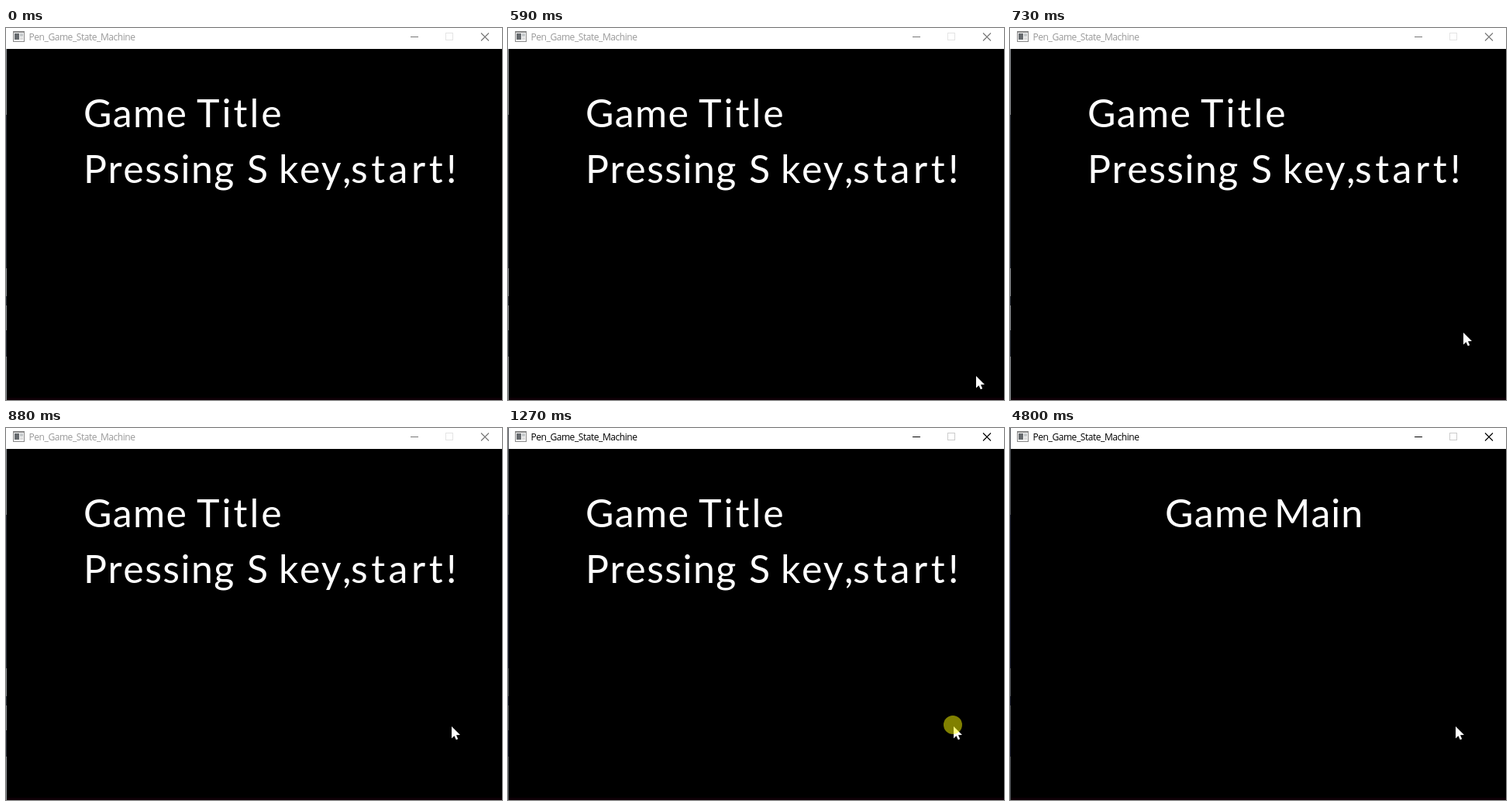
Animation, 640 px wide and 480 px high, one loop 8000 ms. Source, as an HTML page with a canvas:

```html
<!DOCTYPE html>
<html lang="en">
<head>
<meta charset="utf-8">
<title>Pen_Game_State_Machine</title>
<style>
  html, body { margin: 0; width: 100%; height: 100%; overflow: hidden; background: #000; }
  canvas { display: block; width: 640px; height: 480px; }
</style>
</head>
<body>
<canvas id="stage" width="640" height="480"></canvas>
<script>
const ctx = document.getElementById('stage').getContext('2d');
const LOOP = 8000;
const BIG = '50px Lato, "Open Sans", sans-serif';
const SMALL = '12px "Open Sans", "Noto Sans", sans-serif';

function rect(color, x, y, w, h) {
  ctx.fillStyle = color;
  ctx.fillRect(x, y, w, h);
}

function lines(color, ...segments) {
  ctx.strokeStyle = color;
  ctx.lineWidth = 1.1;
  ctx.beginPath();
  for (const [x1, y1, x2, y2] of segments) {
    ctx.moveTo(x1, y1);
    ctx.lineTo(x2, y2);
  }
  ctx.stroke();
}

// Places the visible left edge of the text at x.
function text(str, x, y, font, color, tracking) {
  ctx.font = font;
  ctx.fontKerning = 'none';
  ctx.letterSpacing = tracking + 'px';
  ctx.fillStyle = color;
  ctx.fillText(str, x + ctx.measureText(str).actualBoundingBoxLeft, y);
}

function word(str, x, y, tracking) {
  text(str, x, y, BIG, '#fff', tracking);
}

function icon() {
  rect('#8a8a8a', 9, 4, 15, 14);
  rect('#f4f4f4', 10, 6, 13, 11);
  rect('#666a6e', 11, 7, 6, 8);
  rect('#c4c8ca', 18, 7, 4, 4);
  rect('#dcdcdc', 18, 12, 4, 3);
}

function frame(active) {
  const edge = active ? '#50545a' : '#8c9094';
  const dark = active ? '#1c2030' : '#30363e';
  rect('#000', 0, 0, 640, 480);
  rect('#0e0006', 0, 477, 640, 3);
  rect('#fff', 0, 0, 640, 27);

  rect(edge, 0, active ? 0 : 27, 1, 480);
  rect(dark, 0, 112, 1, 198);
  rect(dark, 0, 346, 1, 12);
  rect(dark, 0, 390, 1, 34);

  icon();
  text('Pen_Game_State_Machine', 30.5, 16, SMALL, active ? '#000' : '#999', -0.45);

  const ink = active ? '#000' : '#777';
  lines(ink, [522, 11.5, 532, 11.5], [613, 6.5, 623, 16.5], [623, 6.5, 613, 16.5]);
  ctx.strokeStyle = active ? '#ccc' : '#e4e4e4';
  ctx.lineWidth = 1;
  ctx.strokeRect(567.5, 6.5, 9, 9);
}

function titleScreen() {
  word('Game', 102, 127.5, 1.3);
  word('Title', 246, 127.5, 3);
  word('Pressing', 104, 199.5, 1.5);
  word('S', 312, 199.5, 0);
  word('key,', 355, 199.5, 1.5);
  word('start!', 446, 199.5, 4.5);
}

function mainScreen() {
  word('Game', 202, 127.5, 1.3);
  word('Main', 345, 127.5, 1);
}

function pointer(t) {
  const step = Math.min(12, Math.floor((t - 540) / 27.5));
  const left = 1 - step / 12;
  const x = Math.round(575 + 34 * left ** 1.71);
  const y = Math.round(385 + 86 * left ** 3.36);
  const shape = [[0, 0], [0, 15.5], [3.5, 12.2], [5.8, 17.2], [8.2, 16.2], [6, 11.2], [11, 11]];
  ctx.fillStyle = '#fff';
  ctx.beginPath();
  for (const [dx, dy] of shape) ctx.lineTo(x + dx, y + dy);
  ctx.fill();
}

function clickSpot() {
  ctx.fillStyle = 'rgba(255, 255, 0, 0.5)';
  ctx.beginPath();
  ctx.arc(574, 383, 12, 0, Math.PI * 2);
  ctx.fill();
}

function draw(t) {
  frame(t >= 1270);
  if (t < 4800) titleScreen();
  else mainScreen();
  if (t >= 550) pointer(t);
  if (t >= 1250 && t < 1370) clickSpot();
}

const start = performance.now();
function tick() {
  draw((performance.now() - start) % LOOP);
  requestAnimationFrame(tick);
}
tick();
</script>
</body>
</html>
```
